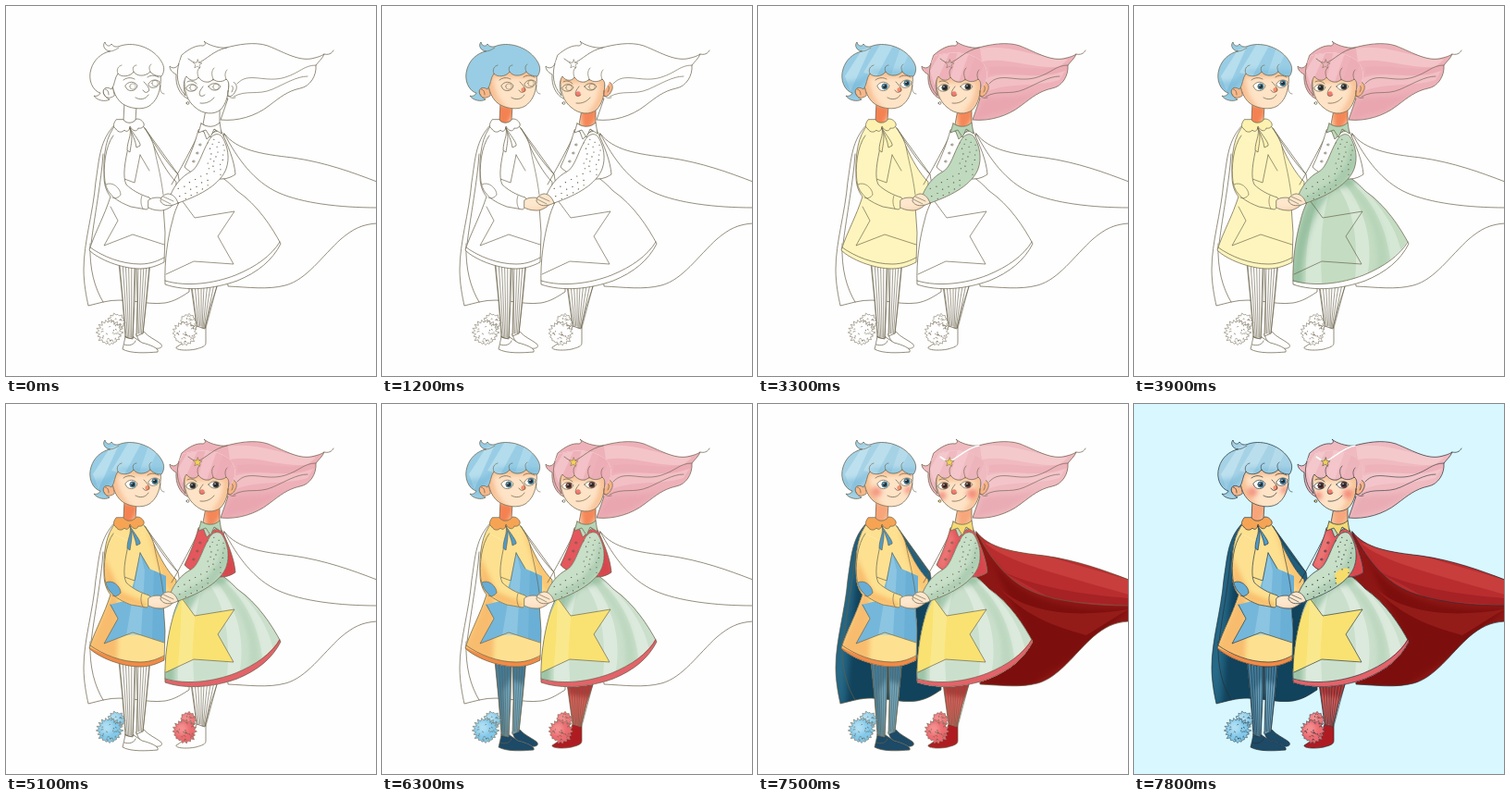
Write an HTML page that moves like this. It is 400 px wide and 400 px high and loops after 8 s.

```html
<!DOCTYPE html>
<html lang="en">
<head>
<meta charset="utf-8">
<title>Two caped friends</title>
<style>
html, body { margin: 0; width: 100%; height: 100%; overflow: hidden; background: #fefefe; }
svg { display: block; width: 100vw; height: 100vh; stroke-linecap: round; stroke-linejoin: round; }
.soft { filter: blur(2.5px); }
</style>
</head>
<body>
<svg id="art" viewBox="0 0 400 400"></svg>
<script>
const LOOP = 8000, STEP = 300;
const art = document.getElementById('art');
const layers = [];
let clips = 0, seed = 7;

// Moment at which each coat of paint lands.
const T = {
  skin: 300, skinShade: 600, nose: 900, blueHair: 1200, blueShine: 1500, pinkHair: 1800, pinkShine: 2100,
  eyes: 2400, pupils: 2700, dress: 3000, sleeve: 3300, skirt: 3600, folds: 3900, vest: 4200,
  shade: 4500, trim: 4800, pom: 5100, blueLegs: 5400, blueShoes: 5700, redLegs: 6000, redShoes: 6300,
  blueCape: 6600, redCape: 6900, capeShade: 7200, cheeks: 7500, sky: 7800
};

const rnd = () => (seed = seed * 16807 % 2147483647) / 2147483647;

function add(tag, attrs, parent = art) {
  const el = document.createElementNS('http://www.w3.org/2000/svg', tag);
  for (const k in attrs) el.setAttribute(k, attrs[k]);
  parent.append(el);
  return el;
}

function coat(from, d, fill, opacity = 1, soft = false, parent = art) {
  const el = add('path', { d, fill, opacity }, parent);
  if (soft) el.setAttribute('class', 'soft');
  layers.push([el, from]);
}

const ink = (d, width = 0.7) => add('path', { d, fill: 'none', stroke: 'currentColor', 'stroke-width': width });

// Paper-white shape, flat coats [time, colour], clipped shades [time, path, colour, opacity, soft], outline.
function part(d, coats = [], shades = [], outline = d) {
  add('path', { d, fill: '#fefefe' });
  for (const [t, c] of coats) coat(t, d, c);
  if (shades.length) {
    const id = 'c' + clips++;
    add('path', { d }, add('clipPath', { id }));
    const g = add('g', { 'clip-path': `url(#${id})` });
    for (const [t, p, c, o, soft] of shades) coat(t, p, c, o, soft, g);
  }
  if (outline) ink(outline);
}

const disc = (x, y, r) => `M${x - r} ${y}a${r} ${r} 0 1 0 ${2 * r} 0a${r} ${r} 0 1 0 ${-2 * r} 0Z`;

function stripes(a, b, y0, c, d, y1, n) {
  let p = '';
  for (let i = 0; i <= n; i++) {
    const k = i / n;
    p += `M${a + (b - a) * k} ${y0}L${c + (d - c) * k} ${y1}`;
  }
  ink(p, 0.6);
}

// Shaggy ball: spiky rim with short curved hairs.
function pom(x, y, r, col, light) {
  const n = Math.round(r * 1.5);
  let d = '', tufts = '';
  for (let i = 0; i <= n * 2; i++) {
    const a = i * Math.PI / n, q = i % 2 ? r * (0.82 + rnd() * 0.1) : r * (0.95 + rnd() * 0.2);
    d += `${i ? 'L' : 'M'}${x + q * Math.cos(a)} ${y + q * Math.sin(a)}`;
  }
  for (let i = 0; i < n; i++) {
    const a = rnd() * 6.28, q = r * 0.8 * Math.sqrt(rnd());
    tufts += `M${x + q * Math.cos(a)} ${y + q * Math.sin(a)}q${rnd() * 3 - 1} -2 ${rnd() * 3} ${rnd() * 3 - 1}`;
  }
  part(d + 'Z', [[T.pom, col]], [[T.pom, disc(x - r * .25, y - r * .25, r * .55), light, 0.7, true]], null);
  ink(d + tufts, 0.5);
}

function eye(d, x, y, iris, late) {
  coat(T.eyes, d, '#fffdf8');
  coat(T.eyes, disc(x, y, 3.2), iris);
  if (late) coat(T.blueLegs, disc(x, y, 3.2), late);
  coat(T.pupils, disc(x, y, 2), '#22282e');
  coat(T.pupils, disc(x - 1, y - 1, 0.7), '#fff');
  ink(d);
  ink(disc(x, y, 3.2), 0.45);
}

coat(T.sky, 'M0 0H400V400H0Z', '#d8f7fe');

// Capes
part('M118 128C101 145 101 165 97 190C94 225 84 255 84 285C84 300 87 315 89 324L105 320C130 314 150 324 172 321C183 319 190 314 198 309L198 250L186 182L150 132Z',
  [[T.blueCape, '#215f7c']], [
  [T.capeShade, 'M106 190L95 330L200 330V220Z', '#0d3a52', 0.75, true],
  [T.capeShade, 'M97 190L84 290L90 324L94 250L104 160Z', '#2f7896', 0.55, true]]);
ink('M105 320C96 305 90 285 91 257M92 257C96 225 103 190 105 160');

const capeTop = 'M236 138C250 156 275 160 310 164C345 169 375 180 401 190L401 218C360 218 320 213 295 202C268 190 250 165 236 138Z';
part('M236 138C250 156 275 160 310 164C345 169 375 180 401 190L401 235C385 236 375 241 362 252C342 270 325 296 302 302C283 307 262 304 240 303L230 200Z',
  [[T.redCape, '#8d1715']], [
  [T.redCape, capeTop, '#b92d2f', 1],
  [T.capeShade, 'M250 165C280 215 340 225 400 222L340 275L290 308L240 305L296 258Z', '#6c0806', 0.5, true],
  [T.capeShade, 'M262 200C290 225 340 232 400 222L355 250C320 240 290 230 262 200Z', '#a52620', 0.6],
  [T.capeShade, 'M240 145C260 168 310 180 401 206V190L310 164L245 150Z', '#d5504c', 0.5],
  [T.capeShade, 'M262 180C300 198 350 206 401 210V218L320 212Z', '#9a1b1d', 0.6]]);
ink('M236 138C250 165 268 190 295 202C320 213 360 218 401 218');

// Legs, shoes and pompoms
part('M141 355L149 352C154 358 162 361 167 365C171 369 166 371 160 370C150 369 143 364 141 355Z', [[T.blueShoes, '#1d4a67']]);
part('M141 280L142 320L141 357L148 354L152 318L156 276Z', [[T.blueLegs, '#6ba9c8']],
  [[T.blueLegs, 'M138 275H160V305L138 298Z', '#245f80', 0.6, true]]);
stripes(143, 155, 280, 142, 148, 354, 4);
part('M129 357C128 363 127 367 126 371C135 376 152 375 164 374C166 370 155 366 147 364L138 358Z', [[T.blueShoes, '#1d4a67']]);
part('M122 278L126 318L129 358L137 360L139 320L140 282Z', [[T.blueLegs, '#6ba9c8']],
  [[T.blueLegs, 'M120 275L129 358L133 358L131 310L144 290V275Z', '#245f80', 0.6, true]]);
stripes(123, 139, 280, 130, 137, 358, 5);
ink('M129 357C132 360 135 360 138 358M128 366C133 368 139 366 140 362');
pom(119, 342, 9, '#8fcdea', '#cdeefa');
pom(112, 353, 13, '#82c8ea', '#c2e9f8');

part('M206 346C204 356 192 364 184 369C183 372 195 373 205 371C212 369 216 368 216 364L216 348Z', [[T.redShoes, '#ae1c22']]);
part('M200 302L206 346L215 349L221 325L229 300Z', [[T.redLegs, '#df5c58']],
  [[T.redLegs, 'M198 300H232L226 318L202 314Z', '#9d2023', 0.6, true]]);
stripes(201, 211, 304, 207, 211, 346, 3);
stripes(214, 228, 303, 212, 216, 348, 4);
pom(197, 342, 8.5, '#ee767a', '#f8a5a2');
pom(193, 354, 12, '#ec6a70', '#f7a19f');

// Boy's dress
const star = 'M145 160L155 178L173 186V258L137 247L106 259L121 232L112 217L132 212L139 190Z';
part('M119 128C108 140 105 160 106 185C106 195 110 203 113 206C106 228 96 245 90 264C100 274 125 284 145 284C156 284 165 280 171 277L172 245L170 216L178 206C184 200 184 192 184 190C175 182 166 165 160 152C157 142 152 134 148 130Z',
  [[T.dress, '#fef5be'], [T.shade, '#fde191']], [
  [T.shade, 'M106 150L104 190L113 206L88 266L120 278L122 215L112 180Z', '#f5a457', 0.6, true],
  [T.shade, 'M152 134L186 190L178 208L168 185Z', '#f8b25d', 0.55, true],
  [T.shade, star, '#74b7da', 1],
  [T.shade, 'M145 160L150 180L146 250L130 250L140 190Z', '#9bcfe6', 0.6],
  [T.shade, 'M160 180L173 186V258L158 254Z', '#5aa2cc', 0.4],
  [T.trim, 'M88 262C105 271 125 279 145 279C157 279 165 275 173 272V282L145 288L86 270Z', '#f18b48', 1]]);
ink('M91 261C105 271 125 279 145 279C157 279 165 275 171 272');
ink('M145 161L155 178M113 217L121 232L106 259L137 247L171 258M145 161L139 191L128 187', 0.65);
ink('M160 152C162 164 167 180 170 204', 0.6);

// Girl's skirt
const hem = 'M170 297C195 304 225 300 248 291C270 282 287 270 296 253L302 258L260 305L170 312Z';
part('M199 193C190 205 183 218 180 232C175 250 171 275 172 301C195 309 225 306 250 297C272 288 288 275 297 257C288 240 272 215 250 200C244 194 238 188 234 186Z',
  [[T.skirt, '#c3dcc2'], [T.shade, '#cbe0cc']], [
  [T.folds, 'M216 190C238 214 244 260 238 304L250 300C262 262 250 215 224 188Z', '#fff', 0.32],
  [T.folds, 'M204 196C190 225 184 265 186 308H204C200 268 202 225 214 194Z', '#fff', 0.3],
  [T.folds, 'M230 187C258 208 274 240 278 282L290 270C284 238 265 212 236 187Z', '#fff', 0.3],
  [T.folds, 'M199 190C186 210 172 250 170 304H182C182 260 192 225 214 200L240 192V184Z', '#6fa681', 0.5, true],
  [T.folds, 'M222 190C254 216 268 250 262 292L274 284C276 248 260 215 232 188Z', '#9cc4a2', 0.3, true],
  [T.shade, 'M190 209L204 229L247 222L229 249L246 279L203 276L170 291V250L182 228Z', '#f9e272', 1],
  [T.shade, 'M190 209L204 229L201 276L186 284L189 240Z', '#fceda0', 0.6],
  [T.skirt, hem, '#fefefe', 1],
  [T.vest, hem, '#e3636a', 1]]);
ink('M172 297C195 304 225 300 248 291C270 282 287 270 296 255');
ink('M190 210L204 229L247 222L229 249L246 279L203 276L173 290', 0.65);

// Girl's vest, shirt and sleeve
ink('M213 129C205 145 195 165 179 193M150 132C162 152 174 170 186 182');
part('M208 134C204 150 198 163 193 174C200 182 216 188 233 187C240 187 245 184 248 182C247 168 240 150 232 134L220 138Z',
  [[T.vest, '#e4575d']], [
  [T.shade, 'M240 150L250 184L232 190Z', '#c9373f', 0.5, true],
  [T.cheeks, 'M208 134L193 174L202 180L213 145Z', '#f08a85', 0.6, true]]);
part('M212 131L217 144L227 134Z', [[T.sleeve, '#c0dabd']]);
ink([[210, 150], [207, 159], [203, 168]].map(([x, y]) => disc(x, y, 1.1)).join(''), 0.6);

part('M218 148C222 138 230 136 234 142C240 152 242 165 238 176C232 192 212 204 186 213C181 212 177 207 178 204C182 194 190 184 200 179C208 175 212 158 218 148Z',
  [[T.sleeve, '#bfdabf'], [T.shade, '#c8dfc8']], [
  [T.folds, 'M236 145L242 170L225 195L186 214L182 210L215 190L230 170Z', '#86b392', 0.4, true],
  [T.sky, 'M217 184C222 177 230 176 233 179C234 186 225 194 219 195Z', '#f7dc6b', 1]]);
let dots = '';
for (let i = 0; i < 38; i++) {
  const k = i / 37, up = k < 0.55, j = (i % 3 - 1) + rnd() * 0.5;
  const x = up ? 228 - k * 10 + j * 6.5 : 220 - (k - 0.55) * 74 + j * 3;
  const y = up ? 145 + k * 65 + j * 1.5 : 184 + (k - 0.55) * 44 + j * 6;
  dots += `M${x} ${y}h.3`;
}
ink(dots, 1.1);

// Boy's near sleeve
const cuffed = 'M116 140C107 152 105 175 107 190C109 205 122 212 135 217L152 220C156 218 157 211 155 207C145 204 136 199 130 193C126 185 128 170 133 149';
part(cuffed, [[T.dress, '#fef5be'], [T.shade, '#fde191']], [
  [T.shade, 'M106 165L106 195L125 214L152 222V215L124 203Z', '#f6ab5a', 0.65, true],
  [T.trim, 'M108 193C115 189 124 197 124 204C122 207 118 209 115 207C110 203 108 198 108 193Z', '#67add5', 1]], cuffed);
ink('M108 193C115 189 124 197 124 204C122 207 118 209 115 207M147 205C145 210 146 216 148 219', 0.6);

// Hands
part('M154 210C158 206 166 207 172 208L184 210C182 216 172 222 166 221C160 221 156 219 154 218Z', [[T.skin, '#fde7cd']],
  [[T.skinShade, 'M154 219C162 221 172 220 184 212L178 225H155Z', '#f3b488', 0.4, true]]);
part('M186 213C184 207 180 203 175 203C170 204 167 207 167 211C170 217 178 217 186 213Z', [[T.skin, '#fde7cd']]);
ink('M168 209L178 214M170 206L181 211', 0.6);

// Boy's head
part('M128 104L127 124C131 128 136 128 140 124L141 108Z', [[T.skin, '#fbd3ae']], [
  [T.skinShade, 'M124 106L142 108V116L135 130H124Z', '#f26d3b', 0.8, true],
  [T.redCape, 'M120 100H145V130H120Z', '#fbc79f', 0.5]]);
part('M119 123C116 127 115 131 119 133C121 137 126 137 128 134C130 137 134 135 134 130C137 136 142 136 143 132C147 133 150 130 149 127C147 123 144 122 141 122C138 127 130 128 127 123Z',
  [[T.dress, '#fdf2b0'], [T.trim, '#f6a454']]);
const ribbon = [[T.dress, '#fdf2b0'], [T.trim, '#4f9cc9']];
part('M134 132C136 140 131 146 131 156L134 158C135 150 138 140 134 132Z', ribbon);
part('M134 132C139 140 146 148 145 151L141 153C140 145 136 138 134 132Z', ribbon);
part('M115 87C107 83 102 91 107 97C109 100 113 100 117 97Z', [[T.skin, '#f8b88a']]);
part('M114 72C114 88 117 98 125 105C133 111 147 113 155 108C162 103 166 95 167 84C168 78 167 74 166 70Z', [[T.skin, '#fee3c6']], [
  [T.skinShade, 'M112 70V92L126 108L138 113C127 104 121 94 120 77H168V68Z', '#f3a066', 0.55, true],
  [T.cheeks, disc(128, 95, 5.5), '#ef6f5f', 0.65, true],
  [T.cheeks, disc(163, 93, 4.5), '#ef6f5f', 0.6, true]]);
coat(T.nose, disc(153, 90.5, 2.6), '#f0795a', 0.8);
ink('M149 82C153 86 157 91 153 93C151 94 149 93 148 91M140 99C145 102 151 101 154 96M127 80C131 77 135 77 139 79M153 77C157 74 161 75 165 77M107 90C110 90 111 93 111 96');
eye('M129 86C132 81 139 81 142 86C141 92 134 93 131 90Z', 137, 87, '#3486b2');
eye('M154 84C157 79 163 79 166 82C166 88 158 90 155 87Z', 161, 83.5, '#3486b2');
part('M112 49C106 48 104 42 107 39C108 44 113 44 114 41C116 44 119 45 124 43C140 38 160 46 168 60C172 66 171 72 168 76C163 76 158 74 156 71C150 77 141 76 138 71C134 77 124 77 121 73C117 78 118 85 114 90C108 86 103 90 106 96C108 99 110 100 112 101C107 104 98 102 95 97C97 98 101 97 102 94C94 92 88 80 92 68C95 58 103 51 112 49Z',
  [[T.blueHair, '#98cde5'], [T.cheeks, '#a6d2e6']], [
  [T.blueShine, 'M112 48L94 76L100 92L122 44Z', '#cbe9f3', 0.6],
  [T.blueShine, 'M132 42L114 72L128 76L146 43Z', '#cbe9f3', 0.55],
  [T.blueShine, 'M154 45L144 74L153 74L163 52Z', '#cbe9f3', 0.4],
  [T.blueShine, 'M90 82L104 98L116 82L121 73L150 77L172 74V70L125 69L110 80Z', '#5fa9d0', 0.4, true]]);
ink('M112 49C116 49 119 47 122 45M121 73C119 69 121 65 125 64M138 71C136 67 138 64 141 64M156 71C154 67 155 64 157 63M167 86C166 92 168 95 171 95', 0.6);

// Girl's hair, neck and head
part('M190 53C198 46 206 42 213 43C216 42 216 40 214 38C218 42 230 46 238 45C250 42 268 38 283 43C303 51 318 61 334 56C338 55 341 54 344 52C342 57 338 60 335 64C336 75 329 87 318 89C304 92 296 99 284 108C270 119 250 125 232 123L240 100L196 100C188 96 183 86 184 74C180 72 177 69 177 65C181 69 186 66 187 62Z',
  [[T.pinkHair, '#eeb1b9'], [T.cheeks, '#efbac0']], [
  [T.pinkShine, 'M240 46C270 40 300 56 335 58L325 66C295 68 270 55 242 60Z', '#f8d5d7', 0.55],
  [T.pinkShine, 'M246 78C275 68 300 82 332 70L326 80C300 88 275 82 248 92Z', '#f8d5d7', 0.4],
  [T.pinkShine, 'M242 102C260 96 280 102 305 92L270 114L232 124Z', '#e0939f', 0.35, true],
  [T.pinkShine, 'M250 66C280 62 305 74 334 62L336 68C305 82 280 70 250 74Z', '#e7a0ab', 0.3]]);
ink('M344 52C348 53 352 52 354 48', 0.7);
ink('M250 84C262 70 280 84 302 77C318 72 322 64 335 64M246 98C260 90 272 97 288 90C302 84 314 76 326 76', 0.6);
part('M216 112L213 128C220 133 226 132 231 127L231 108Z', [[T.skin, '#fbd3ae']], [
  [T.skinShade, 'M214 110H233V120L224 134H217Z', '#f26d3b', 0.75, true],
  [T.redCape, 'M210 100H235V135H210Z', '#fbc79f', 0.5]]);
part('M211 127L208 137L216 134L221 142L225 133L233 138L231 126C226 131 218 132 211 127Z',
  [[T.sleeve, '#b5d4b5'], [T.capeShade, '#f5da74']]);
part('M239 84C246 78 252 86 248 92C246 97 242 99 239 97Z', [[T.skin, '#f7b286']]);
part('M193 76C192 92 196 103 205 110C213 117 225 118 232 112C238 106 241 96 241 80Z', [[T.skin, '#fee3c6']], [
  [T.skinShade, 'M190 74H243V98L232 114L220 118C230 108 236 96 235 83H190Z', '#f3a066', 0.5, true],
  [T.cheeks, disc(199, 99, 4.5), '#ef6459', 0.65, true],
  [T.cheeks, disc(231, 97, 5.5), '#ef6459', 0.65, true]]);
coat(T.nose, disc(212, 95, 2.7), '#ee6a60', 0.85);
ink('M213 87C210 91 208 94 210 97C212 98 214 97 215 96M210 105C216 106 222 103 225 99M196 82C199 80 203 81 206 84M219 82C223 79 228 79 231 81M243 86C246 86 246 90 244 93');
eye('M195 88C198 83 205 84 207 88C205 93 198 93 196 91Z', 202, 88.3, '#39393b', '#7d342b');
eye('M219 87C222 82 230 83 232 87C230 92 222 93 219 87Z', 227, 87.3, '#39393b', '#7d342b');
part('M187 62C184 72 184 86 194 97C191 88 192 80 195 76C199 82 206 81 208 77C212 83 220 84 224 79C228 83 235 82 238 79C242 82 241 88 240 92C246 84 250 76 246 66C240 52 215 46 191 54Z',
  [[T.pinkHair, '#eeb1b9'], [T.cheeks, '#efbac0']], [
  [T.pinkShine, 'M196 53L186 70L191 86L207 51Z', '#f8d5d7', 0.5],
  [T.pinkShine, 'M216 49L208 78L217 82L228 51Z', '#f8d5d7', 0.45],
  [T.pinkShine, 'M236 52L226 80L236 82L245 62Z', '#e7a0ab', 0.25]],
  'M187 62C184 72 184 86 194 97C191 88 192 80 195 76C199 82 206 81 208 77C212 83 220 84 224 79C228 83 235 82 238 79C242 82 241 88 240 92');
ink('M208 77C206 72 207 68 210 66M224 79C222 74 222 70 225 67M238 79C236 75 237 71 239 69M240 92C238 97 243 101 248 99', 0.6);
part(disc(196.5, 105, 1.4), [[T.capeShade, '#f5da74']]);

// Tiara
const band = 'M197 57C201 60 204 62 207 62C217 58 224 48 239 45';
ink(band);
layers.push([add('path', { d: band, fill: 'none', stroke: '#fff', 'stroke-width': 1.6 }), T.cheeks]);
let gem = '';
for (let i = 0; i < 10; i++) {
  const a = i * Math.PI / 5 - 1.5, r = i % 2 ? 2.2 : 5;
  gem += `${i ? 'L' : 'M'}${207 + r * Math.cos(a)} ${63 + r * Math.sin(a)}`;
}
part(gem + 'Z', [[T.pinkHair, '#eeb1b9'], [T.trim, '#f6d254']], [], null);
ink(gem + 'Z', 0.5);

const start = performance.now();
let shown = -1;
function draw() {
  const t = Math.floor((performance.now() - start) % LOOP / STEP) * STEP;
  if (t !== shown) {
    shown = t;
    for (const [el, from] of layers) el.style.display = t >= from ? '' : 'none';
    art.style.color = t >= T.sky ? '#263238' : '#665d45';
  }
  requestAnimationFrame(draw);
}
draw();
</script>
</body>
</html>
```
